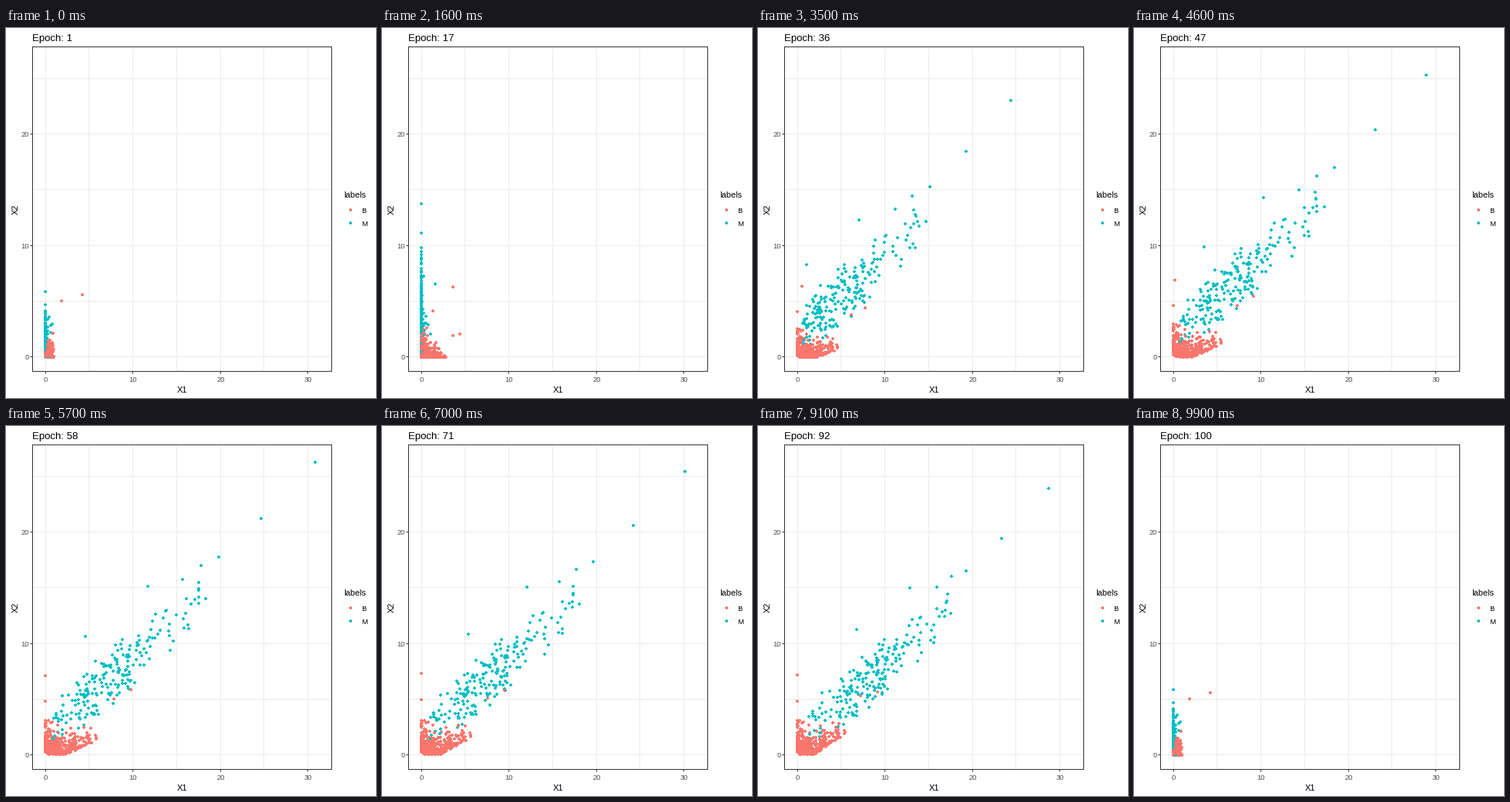
A matplotlib script that plays this animation: 480 px wide and 480 px high, repeating every 10 s.

```python
import numpy as np
import matplotlib.pyplot as plt
from matplotlib.animation import FuncAnimation

FRAMES, STEP = 100, 100
CORAL, TEAL = "#F8766D", "#00BFC4"
DARK, GRID = "#333333", "#EBEBEB"
N_MALIGNANT, N_BENIGN = 204, 353
DOT = 2.6
rng = np.random.default_rng(11)

# Training progress: seconds -> position between the key poses
TIMES = [0, 1.6, 2.2, 3.3, 3.5, 4.4, 5.5, 5.7, 7.0, 8.4, 9.8]
POSES = [0, 1, 1.43, 1.95, 2, 2.64, 2.97, 3, 4, 5, 6]

# A few conspicuous samples, placed at the fourth pose
FAR_M = [(30.85, 26.25), (24.7, 21.2), (19.85, 17.75), (17.8, 17.0),
         (18.35, 14.0), (15.7, 15.75), (11.7, 15.1), (4.6, 10.6)]
FAR_B = [(9.8, 5.85), (7.8, 5.0)]

# Two samples that slide back to the axis: x, y at the first six poses
RETREAT = [
    (4.25, 5.55, 3.6, 6.25, .5, 6.3, 0, 7.1, 0, 7.3, 0, 7.2),
    (1.85, 5.0, 1.35, 4.1, 0, 4.05, 0, 4.8, 0, 4.95, 0, 4.85),
]


def xy(x, y):
    return np.stack([x, y], axis=-1)


def noise(n, sd):
    return rng.normal(0, sd, n)


def spread_m(n):
    """A cloud that bends up along the diagonal."""
    x = np.minimum(rng.gamma(2.6, 2.9, n), 17.5)
    y = 3 + .38 * x + .016 * x ** 2 + np.clip(noise(n, 1.25), -2.3, 2.8)
    return np.vstack([FAR_M, xy(x, np.maximum(y, 1.4))])


def spread_b(n):
    """A wedge along the bottom, plus a column at the left axis."""
    n_column = n // 4
    m = n - n_column
    x = np.abs(noise(m, 2.8)) % 6.5
    y = .35 * np.maximum(x - 2.3, 0) + np.abs(noise(m, .75))
    wedge = xy(x, np.minimum(y, 3.2))
    x = np.maximum(noise(n_column, .5), 0)
    y = .35 + rng.exponential(.8, n_column) % 3
    return np.vstack([FAR_B, wedge, xy(x, y)])


def poses_m(p):
    x, y = p.T
    n = len(x)
    fade = np.minimum(1, x / 5)[:, None]
    k1 = xy(.4 * (y - x) - .9 + noise(n, .5),
            .62 * y - .004 * y ** 2 + noise(n, .4))
    k0 = xy(rng.normal(-.5, .45, n), .42 * k1[:, 1] + noise(n, .2))
    k2 = xy(1.1 * x - .33 * y - .85, .104 * x + .784 * y - .75)
    k5 = xy(.766 * x + .15 * y + 1.49, 1.072 * y - .142 * x + .49)
    k2, k5 = (p + fade * (k - p) for k in (k2, k5))
    return np.stack([k0, k1, k2, p, p + .4 * (k5 - p), k5], axis=1)


def poses_b(p):
    x, y = p.T
    n = len(x)
    k1 = xy(.45 * x + noise(n, .2), .75 * y - .25 * x + noise(n, .3))
    k0 = xy(rng.normal(.35, .25, n), rng.normal(.4, .45, n) + .2 * k1[:, 1])
    k2 = xy(.79 * x, .85 * y - .05 * x - .1)
    k5 = xy(.94 * x, y + .3 * np.maximum(x - 2, 0) * (1 - x / 9))
    return np.stack([k0, k1, k2, p, p + .5 * (k5 - p), k5], axis=1)


groups = [poses_m(spread_m(N_MALIGNANT)),
          np.vstack([poses_b(spread_b(N_BENIGN)),
                     np.reshape(RETREAT, (-1, 6, 2))])]
keys = np.vstack(groups)
drift = keys[:, 5] + .6 * (keys[:, 5] - keys[:, 4])
keys = np.concatenate([keys, drift[:, None]], axis=1)
colors = np.repeat([TEAL, CORAL], [len(g) for g in groups])
order = rng.permutation(len(keys))
keys, colors = keys[order], colors[order]


def px(x):
    return 51 + 11.35 * x


def py(y):
    return 426.5 - 14.45 * y


def positions(i):
    """Dot centres on whole pixels; the final frame is back at the start."""
    t = (i % (FRAMES - 1)) * STEP / 1000
    s = np.interp(t, TIMES, POSES)
    k = min(int(s), 5)
    p = keys[:, k] + (s - k) * (keys[:, k + 1] - keys[:, k])
    if 5.7 < t < 7:
        p = p * (1 + .016 * np.sin(np.pi * (t - 5.7) / 1.3))
    p = np.maximum(p, 0)
    return np.floor(xy(px(p[:, 0]), py(p[:, 1])) + .5)


plt.rcParams["font.family"] = "Liberation Sans"
fig = plt.figure(figsize=(480 / 72, 480 / 72), dpi=72, facecolor="white")
ax = fig.add_axes([0, 0, 1, 1])
ax.set(xlim=(0, 480), ylim=(480, 0))
ax.axis("off")

L, R, T, B = 34.5, 422.5, 24.5, 445.5


def line(xs, ys, color, z=1):
    ax.plot(xs, ys, color=color, lw=1, zorder=z, snap=False,
            solid_capstyle="butt", solid_joinstyle="miter")


def label(x, y, s, size=9.2, color="black", **kw):
    return ax.text(x, y, s, size=size, color=color, **kw)


def scatter(points, c, z=1):
    return ax.scatter(*np.transpose(points), s=DOT ** 2, c=c, lw=0,
                      antialiased=False, zorder=z)


for v in range(0, 31, 5):
    gx = np.floor(px(v)) + .5
    line([gx, gx], [T, B], GRID)
    if v % 10 == 0:
        line([gx, gx], [B, B + 3], DARK, 4)
        label(gx, 459, str(v), color="#4D4D4D", ha="center")
for v in range(0, 26, 5):
    gy = np.floor(py(v)) + .5
    line([L, R], [gy, gy], GRID)
    if v % 10 == 0:
        line([L - 3, L], [gy, gy], DARK, 4)
        label(29.5, gy + 3.3, str(v), color="#4D4D4D", ha="right")
line([L, R, R, L, L], [T, T, B, B, T], DARK, 4)

title = label(34, 17, "", 13.2)
label(228, 473, "X1", 11, ha="center")
label(12.3, 235, "X2", 11, ha="center", va="center", rotation=90)
label(438.5, 220, "labels", 11)
label(461.5, 240, "B")
label(461.5, 257, "M")
scatter([(447, 236), (447, 253)], [CORAL, TEAL])
dots = scatter(positions(0), colors, 3)


def update(i):
    title.set_text(f"Epoch: {i + 1}")
    dots.set_offsets(positions(i))
    return title, dots


anim = FuncAnimation(fig, update, frames=FRAMES, interval=STEP, repeat=True,
                     repeat_delay=0)
plt.show()
```
